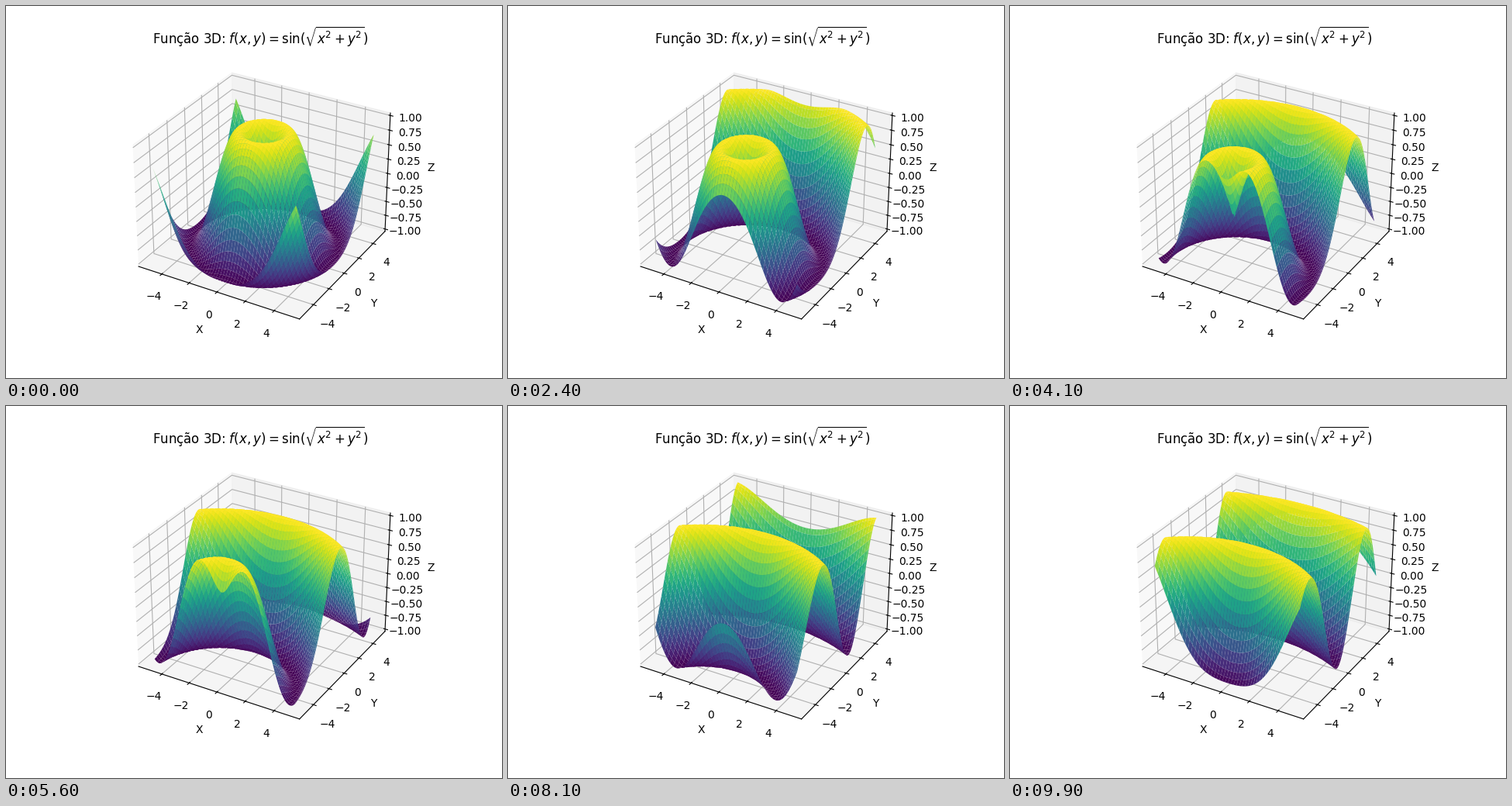
These frames come from a looping animation (640 px wide and 480 px high, 10000 ms). A matplotlib script:

```python
import numpy as np
import matplotlib.pyplot as plt
from matplotlib.animation import FuncAnimation

FRAMES = 100
INTERVAL = 100  # ms
STEP = 0.1      # shift along y per frame
MARGIN = 1 / 48

plt.rcParams["font.family"] = "DejaVu Sans"

fig = plt.figure(figsize=(6.4, 4.8), dpi=100)
ax = fig.add_subplot(projection="3d")
ax.set_title(r"Função 3D: $f(x, y) = \sin(\sqrt{x^2 + y^2})$")
ax.set_xlabel("X")
ax.set_ylabel("Y")
ax.set_zlabel("Z")
ax.set_xlim(-5.5, 5.5, view_margin=MARGIN)
ax.set_ylim(-5.5, 5.5, view_margin=MARGIN)
ax.set_zlim(-1, 1, view_margin=MARGIN)

axis = np.linspace(-5, 5, 100)
X, Y = np.meshgrid(axis, axis)


def update(frame):
    for surface in list(ax.collections):
        surface.remove()
    Z = np.sin(np.hypot(X, Y + STEP * frame))
    return [ax.plot_surface(X, Y, Z, cmap="viridis")]


anim = FuncAnimation(fig, update, frames=FRAMES, interval=INTERVAL,
                     repeat=True, repeat_delay=0, blit=False)
plt.show()
```
